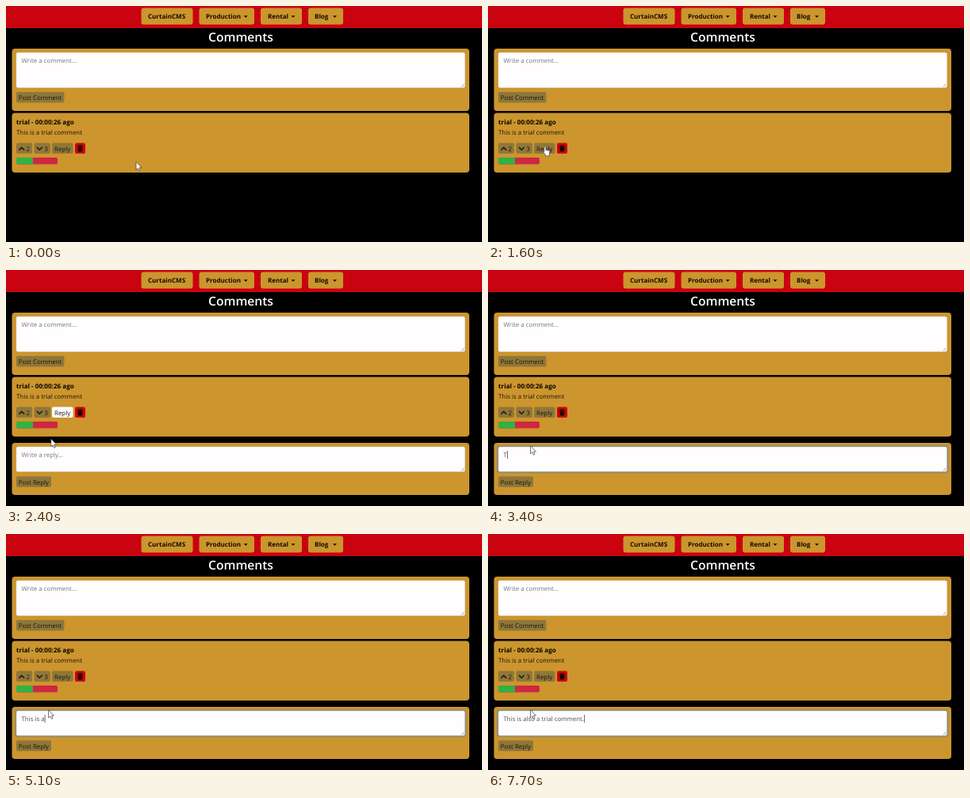
Animation, 600 px wide and 299 px high, one loop 8 s. Source, as an HTML page:

```html
<!DOCTYPE html>
<html lang="en">
<head>
<meta charset="utf-8">
<title>Comments</title>
<style>
  html, body { margin: 0; width: 100%; height: 100%; overflow: hidden; background: #000; }
  svg { display: block; }
  text { font: 7.9px "Open Sans", "Noto Sans", sans-serif; fill: #1b1710; white-space: pre; text-rendering: geometricPrecision; }
  .bold { font-weight: 700; font-size: 8.1px; fill: #080604; }
  .nav text { font-weight: 700; font-size: 8px; fill: #120d04; }
  .title { font-weight: 600; font-size: 15.6px; fill: #fff; text-anchor: middle; }
  .hint { fill: #73777b; }
  #typed { font-size: 7.85px; fill: #4d5053; }
  .gold { fill: #cc952d; }
  .button { fill: #8f7739; }
  .field { fill: #fffdfe; stroke: #d5d2d0; stroke-width: .5; }
  .icon { fill: none; stroke: #1b1710; stroke-width: 1.5; stroke-linecap: round; stroke-linejoin: round; }
  .grip { fill: none; stroke: #77736f; stroke-width: .6; }
  .pointer { fill: #fff; stroke: #3c3c3c; stroke-width: .7; stroke-linejoin: round; }
</style>
</head>
<body>
<svg width="600" height="299" viewBox="0 0 600 299">
  <rect width="600" height="28" fill="#c9030f"/>
  <g class="nav" id="nav"></g>
  <text class="title" x="296" y="45">Comments</text>

  <rect class="gold" x="7.5" y="54" width="576.5" height="79" rx="4"/>
  <rect class="field" x="13" y="59" width="565.5" height="44.5" rx="2"/>
  <path class="grip" d="M573.5 102.5l4-4M576 102.5l1.5-1.5"/>
  <text class="hint" x="19.5" y="72.3">Write a comment...</text>
  <rect class="button" x="13" y="109" width="60.5" height="13.5" rx="2"/>
  <text x="15.8" y="119">Post Comment</text>

  <rect class="gold" x="7.5" y="135.5" width="576.5" height="75.5" rx="4"/>
  <text class="bold" x="13" y="150.3">trial - 00:00:26 ago</text>
  <text x="13" y="163">This is a trial comment</text>
  <rect class="button" x="13" y="173.5" width="20" height="13.5" rx="2"/>
  <path class="icon" d="M16.8 182.3l3-3 3 3"/>
  <text x="25.6" y="183.6">2</text>
  <rect class="button" x="35.5" y="173.5" width="20.5" height="13.5" rx="2"/>
  <path class="icon" d="M39.3 179.3l3 3 3-3"/>
  <text x="48.2" y="183.6">3</text>
  <rect class="button" id="replyButton" x="58" y="173.5" width="26.5" height="13.5" rx="2"/>
  <text x="61" y="183.6">Reply</text>
  <rect x="87" y="173.5" width="13" height="13.5" rx="2" fill="#c9030f"/>
  <path d="M90 177h2l.6-.8h1.8l.6.8h2v1h-7zM90.5 178.6h6l-.4 6h-5.2z" fill="#1a0505"/>
  <rect x="13" y="192" width="52" height="8.5" rx="2" fill="#cf2742"/>
  <path d="M34 192H15a2 2 0 0 0-2 2v4.500a2 2 0 0 0 2 2h19z" fill="#2fb344"/>

  <g id="replyForm">
    <rect class="gold" x="7.5" y="219" width="576.5" height="66" rx="4"/>
    <rect id="focusRing" x="12" y="223" width="567.5" height="33.500" rx="3" fill="none" stroke="#0d6efd" stroke-opacity=".25" stroke-width="2"/>
    <rect class="field" id="replyField" x="13" y="224" width="565.5" height="31.5" rx="2"/>
    <path class="grip" d="M573.5 254.500l4-4M576 254.500l1.5-1.5"/>
    <text class="hint" id="replyHint" x="19.5" y="237.2">Write a reply...</text>
    <text id="typed" x="19.5" y="237.2"></text>
    <rect id="caret" y="229" width=".7" height="10" fill="#333"/>
    <rect class="button" x="13" y="261.5" width="44" height="13.500" rx="2"/>
    <text x="15.8" y="271.5">Post Reply</text>
  </g>

  <path class="pointer" id="arrow" d="M0 0V10L2.3 8L3.900 11.500L5.500 10.800L4 7.300H7z"/>
  <path class="pointer" id="hand" d="M2 0C2.800 0 3.100.5 3.100 1.200V4.300L7 5.200Q8 5.500 7.800 6.700L7.200 10V12H2.500V10.500L-.2 7.200Q-.5 6 .9 6.300V1.200C.9.5 1.200 0 2 0z"/>
</svg>
<script>
const $ = id => document.getElementById(id);
const show = (id, visible) => $(id).style.display = visible ? "" : "none";

// Label, left edge, width, text start and dropdown mark position
$("nav").innerHTML = [
  ["CurtainCMS", 170.5, 65, 179],
  ["Production", 243.5, 69.5, 252, 299.7],
  ["Rental", 321, 52, 330, 359.5],
  ["Blog", 381, 44, 389, 412]
].map(([label, x, width, textX, markX]) =>
  `<rect class="gold" x="${x}" y="2.5" width="${width}" height="21" rx="3"/>
   <text x="${textX}" y="16.2">${label}</text>` +
  (markX ? `<path d="M${markX} 12.2h5l-2.5 2.600z" fill="#120d04"/>` : "")).join("");

const LOOP = 8000, STEP = 100;
const OPEN = 1700, FOCUS = 2500;
const MESSAGE = "This is also a trial comment.";

// Bursts of typing: start time, first and last length, one letter per step
const bursts = [
  [2900, 1, 2], [3400, 1, 1], [3600, 0, 0], [3800, 1, 1], [4000, 2, 2],
  [4400, 3, 4], [4700, 5, 12], [5800, 13, 14], [6200, 15, 17],
  [6600, 19, 25], [7400, 27, 28], [7700, 29, 29]
];

// Pointer moves: start, end, from, to
const moves = [
  [300, 700, [164, 197.5], [70, 178]],
  [1900, 2600, [70, 178], [53.5, 222.8]]
];

function typedLength(t) {
  const burst = bursts.filter(([start]) => start <= t).pop();
  if (!burst) return 0;
  const [start, first, last] = burst;
  return Math.min(last, first + Math.floor((t - start) / STEP));
}

function pointerAt(t) {
  const [start, end, from, to] = t < moves[1][0] ? moves[0] : moves[1];
  const p = Math.min(1, Math.max(0, (t - start) / (end - start)));
  const eased = p * p * (3 - 2 * p);
  return from.map((value, i) => value + (to[i] - value) * eased);
}

function draw(now) {
  const t = Math.floor(now % LOOP / STEP) * STEP;
  const open = t >= OPEN, focused = t >= FOCUS;
  const length = typedLength(t);

  show("replyForm", open);
  show("focusRing", focused);
  show("caret", focused);
  show("replyHint", !length);
  $("replyButton").style.fill = open && !focused ? "#fffdfe" : "";
  $("replyField").style.stroke = focused ? "#86a7d0" : "";

  $("typed").textContent = MESSAGE.slice(0, length);
  const textWidth = open && length ? $("typed").getComputedTextLength() : 0;
  $("caret").setAttribute("x", 19.7 + textWidth);

  const overButton = t >= 700 && t < 2000;
  const place = `translate(${pointerAt(t)})`;
  for (const id of ["arrow", "hand"]) {
    show(id, overButton === (id === "hand"));
    $(id).setAttribute("transform", place);
  }
  requestAnimationFrame(() => draw(performance.now()));
}
draw(performance.now());
</script>
</body>
</html>
```
